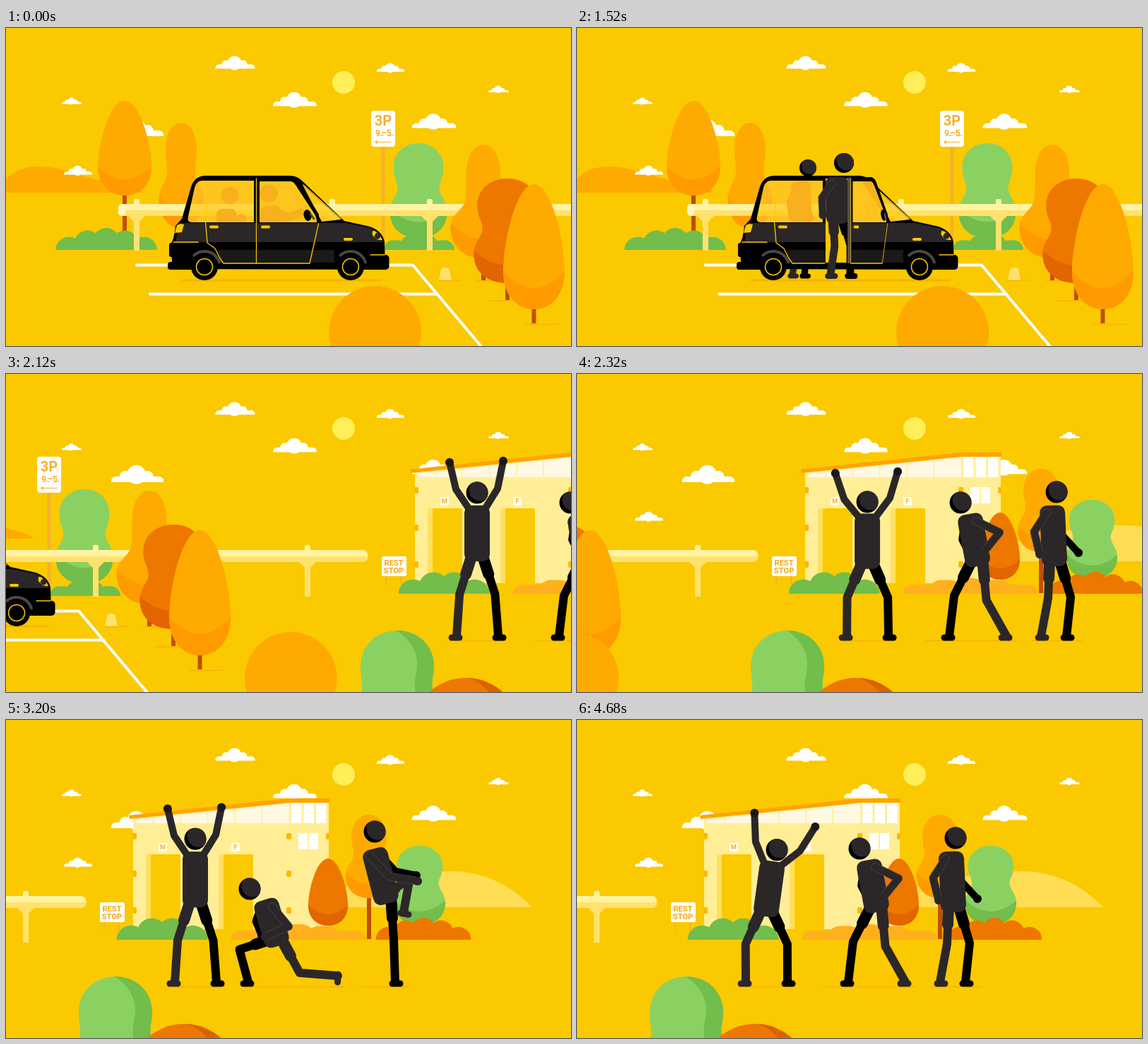
Animation of 800 by 450 pixels, one loop 4720 ms. Source, as an HTML page with a canvas:

```html
<!DOCTYPE html>
<html lang="en">
<head>
<meta charset="utf-8">
<title>Rest stop</title>
<style>
html, body { margin: 0; height: 100%; overflow: hidden; background: #fbc900; }
canvas { display: block; width: 100vw; height: 100vh; }
</style>
</head>
<body>
<canvas id="stage" width="800" height="450"></canvas>
<script>
const g = document.getElementById('stage').getContext('2d');
const LOOP = 4720, STEP = 40, REST_X = 872;
const SKY = '#fbc900', ORANGE = '#ffaa00', AMBER = '#ff9b00', RUST = '#ee7700', BRICK = '#e26500',
  GREEN = '#8bd162', LEAF = '#72bd4b', TRUNK = '#c24d00', CREAM = '#fff3a3', BUTTER = '#ffe26e',
  WALL = '#ffee96', SIGN = '#f5b12a', SHADOW = '#f5b400', INK = '#2b2728', STEEL = '#4a4646',
  BLACK = '#000', WHITE = '#fff';

// Drawing helpers
const fill = (c, d) => { g.fillStyle = c; g.fill(new Path2D(d), 'evenodd'); };
const box = (c, x, y, w, h, r = 0) => { g.fillStyle = c; g.beginPath(); g.roundRect(x, y, w, h, r); g.fill(); };
const disc = (c, x, y, r) => { g.fillStyle = c; g.beginPath(); g.arc(x, y, r, 0, 7); g.fill(); };
const line = (c, w, ...p) => {
  g.strokeStyle = c; g.lineWidth = w; g.lineCap = g.lineJoin = 'round';
  g.beginPath();
  for (let i = 0; i < p.length; i += 2) g.lineTo(p[i], p[i + 1]);
  g.stroke();
};
const text = (s, x, y, size, weight = 700) => {
  g.fillStyle = SIGN; g.textAlign = 'center';
  g.font = `${weight} ${size}px Roboto, Arial, sans-serif`;
  g.fillText(s, x, y);
};
const group = (x, y, draw) => { g.save(); g.translate(x, y); draw(); g.restore(); };
const clamp = v => Math.max(0, Math.min(1, v));
const ramp = (t, a, b) => { const u = clamp((t - a) / (b - a)); return u * u * (3 - 2 * u); };

// Scenery
const EGG = 'M0 0C23 0 40 60 40 90C40 116 22 130 0 130S-40 116-40 90C-40 60-23 0 0 0Z';
const jar = k => {
  const w = k * .5 + 12, n = k * .6;
  return `M0 0C${n} 0 ${k} 15 ${k} 33C${k} 50 ${w - 2} 54 ${w} 65C${w + 2} 74 40 80 40 94C40 118 22 130 0 130` +
    `S-40 118-40 94C-40 80 ${-w - 2} 74 ${-w} 65C${2 - w} 54 ${-k} 50 ${-k} 33C${-k} 15 ${-n} 0 0 0Z`;
};
function tree(shape, x, y, w, h, col, shade, foot) {
  if (foot) box(TRUNK, x - 3, y + h - 8, 6, foot - y - h + 8);
  group(x, y, () => {
    g.scale(w / 80, h / 130);
    fill(col, shape);
    g.clip(new Path2D(shape));
    fill(shade, 'M-50 80Q0 136 50 80V140H-50Z');
  });
}
function bush(col, x, w, base, h, n) {
  for (let i = 0; i < n; i++) {
    const u = (i + .5) / n, r = .72 * w / n, top = h * (.4 + .6 * Math.sin(Math.PI * u));
    box(col, x + w * u - r, base - top, 2 * r, top, [r, r, 0, 0]);
  }
}
function cloud(x, y, s) {
  group(x, y, () => {
    g.scale(s, s);
    box(WHITE, -28, -6, 56, 6, [5, 5, 0, 0]);
    disc(WHITE, -13, -6, 6);
    disc(WHITE, -1, -8, 10);
    disc(WHITE, 11, -6, 6);
  });
}
function clouds() {
  cloud(324.5, 57.5, 1); cloud(409, 110.5, 1.1); cloud(544.5, 62, .7); cloud(697.5, 91, .51);
  cloud(606, 141.5, 1.12); cloud(93, 107.5, .5); cloud(186, 153, 1.33); cloud(102, 207.5, .71);
}
function rail() {
  for (const x of [185, 462, 600, 900]) {
    box(CREAM, x - 4, 242, 8, 12, 2);
    box(BUTTER, x - 4, 262, 8, 53);
    fill(BUTTER, `M${x - 12} 266H${x + 12}L${x + 4} 274H${x - 4}Z`);
  }
  box(BUTTER, 159, 249, 827, 17, 8);
  box(CREAM, 162, 249, 822, 9, [6, 6, 0, 0]);
  box('#fff7c0', 159, 249, 10, 17, 5);
}
function parking() {
  tree(jar(28), 248, 134, 63, 149, ORANGE, AMBER);
  tree(EGG, 168, 103, 76, 134, ORANGE, AMBER, 314);
  box(SIGN, 531.5, 166, 5, 136);
  box(WHITE, 517, 117, 34, 51, 4);
  text('3P', 534, 138, 20);
  text('9', 526.5, 153, 12); text('am', 532, 153, 4); text('–5', 538.5, 153, 12); text('pm', 546, 153, 4);
  line(SIGN, 1.2, 523, 161.5, 545, 161.5);
  line(SIGN, 1.2, 525.5, 159.5, 523, 161.5, 525.5, 163.5);
  tree(jar(35), 584, 163, 81, 134, GREEN, LEAF);
  bush(LEAF, 76, 132, 314, 31, 5);
  bush(LEAF, 540, 90, 314, 22, 4);
  rail();
  fill(BUTTER, 'M613 357L616 342Q617 339 622 339T628 342L631 357Z');
  line(SHADOW, 1.5, 613, 357.5, 644, 357.5);

  line(WHITE, 4, 185, 335.5, 576, 335.5, 674, 452);
  line(WHITE, 4, 204, 376.5, 611, 376.5);

  line(SHADOW, 1.5, 667, 357.5, 692, 357.5);
  line(SHADOW, 1.5, 684, 386, 728, 386);
  line(SHADOW, 1.5, 733, 419.5, 781, 419.5);
  tree(jar(21), 676, 165, 93, 161, ORANGE, AMBER, 357);
  tree(jar(36), 710, 213, 95, 148, RUST, BRICK, 385);
  tree(EGG, 747.5, 221, 87, 177, ORANGE, AMBER, 418);
}

function building() {
  box(WALL, 180, 143, 277, 153);
  fill(WALL, 'M180 139L401 115H457V150H180Z');
  fill('#fff8e2', 'M184 141L401 118V146H184Z');
  for (let i = 0; i < 5; i++) {
    const x = 209 + 38.3 * i;
    line(WALL, 1.5, x, 141 - (x - 184) * .106, x, 146);
  }
  for (let i = 0; i < 3; i++) box(WHITE, 404 + 17.5 * i, 118, 14.5, 28);
  box(WHITE, 414, 160, 28, 23);
  line(WALL, 2, 428, 160, 428, 183);
  fill('#ffa300', 'M174 135L400 111H458V117H402L175 140Z');
  for (const y of [160, 213, 265]) {
    box('#ffb700', 179, y, 6, 9, 2);
    box('#ffb700', 397, y, 7, 9, 2);
  }
  box('#ffb700', 453, 160, 5, 9, 2);
  for (const [x, s] of [[198, 'M'], [301, 'F']]) {
    box('#ffdf60', x, 190, 49, 106, [3, 3, 0, 0]);
    box(SKY, x + 7, 190, 42, 106, [3, 3, 0, 0]);
    box(WHITE, x + 18, 174, 12, 12, 2);
    text(s, x + 24, 183.3, 9);
  }
}
function restArea(t) {
  fill('#ffdd55', 'M400 265C470 236 560 214 630 214C680 214 720 238 745 265Z');
  building();
  line(SIGN, 2, 139, 286, 139, 297);
  line(SIGN, 2, 160, 286, 160, 297);
  box(WHITE, 133, 258, 35, 28, 2.5);
  text('REST', 150, 271, 11, 900); text('STOP', 150, 282, 11, 900);
  tree(jar(30), 514, 134, 66, 118, ORANGE, AMBER, 310);
  tree(EGG, 456, 196, 56, 95, RUST, BRICK);
  tree(jar(36), 586, 178, 72, 112, GREEN, LEAF);
  bush(LEAF, 163, 116, 311, 32, 4);
  bush('#ffb01c', 326, 176, 311, 22, 5);
  bush(RUST, 529, 124, 311, 31, 5);

  for (const [a, b] of [[229, 310], [350, 480], [500, 572]]) line(SHADOW, 1.5, a, 377.5, b, 377.5);
  person(cheering(t), 0);
  person(lunging(t), -1);
  person(hugging(t), 1);

  const shrub = 'M103 415C103 382 127 363 155 363C185 363 207 385 207 413C207 430 202 432 206 452H104C107 435 103 430 103 415Z';
  g.save();
  fill(GREEN, shrub);
  g.clip(new Path2D(shrub));
  fill(LEAF, 'M148 360C172 372 184 393 183 412C182 430 177 432 181 455H215V360Z');
  g.restore();
  g.save();
  disc(RUST, 252, 508, 78);
  g.clip();
  fill('#dc6200', 'M248 428Q275 434 288 455H340V428Z');
  g.restore();
}

// Figures: each pose follows from one or two progress values.
// Hands and feet are [x, y, bend]: the elbow or knee sits beside the middle of the limb.
function cheering(t) {
  const e = ramp(t, 4200, 4680);
  const d = (1 - Math.cos((t - 2120) / 1050 * 2 * Math.PI)) / 2 * (1 - .6 * e);
  return {
    head: [268 + 15 * e, 168 + 41 * d], neck: [268 + 8 * e, 196 + 36 * d], hip: [268, 255 + 34 * d],
    hands: [[229 - 20 * d + 30 * e, 125 + 48 * d - 12 * e, -7], [305 + 19 * d + 25 * e, 123 + 47 * d + 10 * e, 7]],
    feet: [[239, 371, 7 + 12 * d], [298, 371, -7 - 12 * d]]
  };
}
function lunging(t) {
  const u = ramp(t, 2400, 3100) - ramp(t, 3960, 4560), s = Math.sin(Math.PI * u);
  return {
    head: [400 - 55 * u, 182 + 57 * u], neck: [414 - 45 * u, 208 + 56 * u], hip: [424 - 41 * u, 262 + 48 * u],
    hands: [[432 - 65 * u, 253 + 54 * u, -29], [414 - 52 * u, 258 + 47 * u, 8]],
    feet: [[465 + 5 * u, 371 - 9 * u, 12 + 14 * u], [384 - 41 * u - 22 * s, 371 - 26 * s, 10 + 23 * u + 14 * s]]
  };
}
function hugging(t) {
  const u = ramp(t, 2620, 3080) - ramp(t, 3960, 4520);
  return {
    head: [536 - 14 * u, 167 - 9 * u], neck: [530 - 7 * u, 196 - 4 * u], hip: [533 + 5 * u, 262 - 12 * u],
    hands: [[512 + 71 * u, 255 - 27 * u, 13], [567 + 14 * u, 253 - 33 * u, 9]],
    feet: [[514 + 49 * u, 371 - 99 * u, -4 - 39 * u], [550 + u, 371, 10 * u - 11]]
  };
}
function driver(t) {
  const v = ramp(t, 240, 760), u = ramp(t, 760, 1300);
  return {
    head: [372 + 13 * v - 4 * u, 234 - 43 * u], neck: [375 + 4 * v - 8 * u, 260 - 40 * u], hip: [376 - 4 * u, 298 - 30 * u],
    hands: [[412 - 22 * v - 39 * u, 265, 8], [418 - 8 * v - 22 * u, 260 + 5 * u, 6]],
    feet: [[410 - 48 * u, 325 + 24 * u, 14 * u - 18], [415 - 25 * u, 325 + 24 * u, -6]]
  };
}
function rider(t) {
  const v = ramp(t, 240, 760), u = ramp(t, 760, 1300);
  return {
    head: [317 - 7 * v + 20 * u, 237 - 39 * u], neck: [312 + 8 * u, 264 - 39 * u], hip: [312 + 9 * u, 296 - 24 * u],
    hands: [[334 - 27 * u, 268, 6], [336 - 2 * u, 270 - 2 * u, 5]],
    feet: [[330 - 22 * u, 325 + 24 * u, -4], [332 - 5 * v - 2 * u, 325 + 24 * v, -4]]
  };
}

const middle = (x, y, [ex, ey, bend]) => {
  const n = Math.hypot(ex - x, ey - y) || 1;
  return [(x + ex) / 2 - bend * (ey - y) / n, (y + ey) / 2 + bend * (ex - x) / n];
};
// Facing is -1 for left, 1 for right and 0 for the viewer.
function person({ head, neck, hip, hands, feet }, facing, r = 15.5, ground = 371) {
  const k = r / 15.5, near = facing < 0 ? 1 : -1;
  const arm = (side, hand, c) => {
    const x = neck[0] + side * 8 * k, y = neck[1];
    const pts = [x, y, ...middle(x, y, hand), hand[0], hand[1]];
    if (facing && c === INK) line(STEEL, 11.5 * k, ...pts);
    line(c, 10 * k, ...pts);
    disc(facing ? c : '#1a1717', hand[0], hand[1], 6 * k);
  };
  const leg = (side, foot, c) => {
    const x = hip[0] + side * 7 * k, y = hip[1], [fx, fy] = foot, [kx, ky] = middle(x, y, foot);
    line(c, 16 * k, x, y, (x + kx) / 2, (y + ky) / 2);
    line(c, 12 * k, x, y, kx, ky, fx, fy);
    // The sole lies flat on the ground and follows the shin in the air.
    const shin = Math.hypot(fx - kx, fy - ky) || 1, air = clamp((ground - fy) / 8), toe = facing || side;
    const dx = toe * k * (1 - air + air * (fy - ky) / shin), dy = -toe * k * air * (fx - kx) / shin;
    line(c, 9 * k, fx - dx * 4, fy - dy * 4 + 2, fx + dx * 7, fy + dy * 7 + 2);
  };
  arm(-near, hands[1], facing ? BLACK : INK);
  leg(-near, feet[1], BLACK);
  leg(near, feet[0], INK);

  const spine = Math.hypot(hip[0] - neck[0], hip[1] - neck[1]);
  const px = 8 * k * (hip[1] - neck[1]) / spine, py = -8 * k * (hip[0] - neck[0]) / spine;
  line(INK, 20 * k, neck[0] - px, neck[1] - py, neck[0] + px, neck[1] + py,
    hip[0] + px, hip[1] + py, hip[0] - px, hip[1] - py, neck[0] - px, neck[1] - py);
  g.fillStyle = INK;
  g.fill();

  arm(near, hands[0], INK);
  g.save();
  disc(BLACK, head[0], head[1], r);
  g.clip();
  disc(INK, head[0] + 4 * k, head[1] - 4 * k, r);
  g.restore();
}

// Car
const DOOR = 'M355 211H404Q412 212 416 219L443 264V276L431 333H355Z';
const FRONT_GLASS = 'M359 217H402Q407 217 410 222L436 262Q440 268 440 275H359Z';
const REAR_GLASS = 'M277 216H351V275H263Q256 275 258 267L267 226Q270 216 277 216Z';
const SCREEN = 'M420 222L474 271L447 274Z';
const BODY = 'M236 341L233 306Q238 300 240 280L249 270L262 225Q267 209 283 209H402Q412 209 419 216' +
  'L479 273L515 281Q533 287 536 303L537 342Z';

// Yellow glass that turns dark figures behind it orange
function glass(d) {
  fill('rgba(255,196,0,.6)', d);
  g.globalCompositeOperation = 'lighten';
  fill('#f8b01e', d);
  g.globalCompositeOperation = 'source-over';
}
function wheel(x) {
  g.strokeStyle = STEEL; g.lineWidth = 4;
  g.beginPath(); g.arc(x, 338, 22, -2.3, -.3); g.stroke();
  disc(BLACK, x, 338, 19);
  g.strokeStyle = SKY; g.lineWidth = 1.5;
  g.beginPath(); g.arc(x, 338, 11.5, 0, 7); g.stroke();
}
function door(open) {
  const k = 1 - .41 * open;
  box('#555152', 443 - 88 * k - 5 * open, 212, 5 * open, 121);
  group(443, 0, () => {
    g.scale(k, 1); g.translate(-443, 0);
    glass(FRONT_GLASS);
    fill(BLACK, DOOR + FRONT_GLASS);
    fill(INK, 'M356 276H442L436 303H356Z');
    box('#1c1919', 356, 314, 78, 18);
    line(SKY, 1.3, 354.5, 213, 354.5, 333, 430, 333, 442.5, 277);
    box(SKY, 361, 279.5, 13, 4, 2);
  });
  g.fillStyle = BLACK;
  g.beginPath(); g.ellipse(427 + 10 * open, 265, 5.5 - 2 * open, 8, -.2, 0, 7); g.fill();
  line(STEEL, 3, 431 + 8 * open, 263, 436 + 4 * open, 270);
}
function shell() {
  glass(REAR_GLASS);
  glass(SCREEN);
  fill(BLACK, BODY + REAR_GLASS + SCREEN);
  fill(INK, 'M245 276H481L515 283Q530 288 534 303H240Z');
  box('#1c1919', 300, 314, 165, 18);
  box(BLACK, 229, 331, 36, 11, 4);
  box(BLACK, 506, 321, 36.5, 21, 5);
  box(BLACK, 231, 304, 10, 20, 3);
  fill(SKY, 'M239 290L242 279Q247 276 252 278L249 289Z');
  line(SKY, 1.3, 237, 303, 272, 303);
  line(SKY, 1.3, 289, 217, 285, 240, 282.5, 275, 285, 304, 296, 312, 303, 326, 308, 333, 354, 333);
  box(SKY, 288, 279.5, 13, 4, 2);
  box(SKY, 478, 297, 13, 4, 2);
  fill(SKY, 'M519 287Q528 287 533 300Q524 301 519 293Z');
  disc(INK, 526, 294, 4.5);
  disc(SKY, 521, 290.5, 2.5);
  line(SKY, 1.3, 516, 321, 536, 321);
  line(SKY, 1.3, 421, 222, 474, 270);
  fill(SKY, 'M355 213H404L442 270V276L431 332H355Z');
  g.strokeStyle = SIGN; g.lineWidth = 2;
  g.beginPath(); g.ellipse(420, 261, 4, 10, .4, 0, 7); g.stroke();
}
function car(t) {
  const bob = t > 800 && t < 1320 ? Math.sin((t - 880) / 70) : 0;
  line(SHADOW, 3, 250, 357, 531, 357);
  person(rider(t), 1, 12, 349);
  group(0, bob, shell);
  person(driver(t), 1, 12.5 + 1.5 * ramp(t, 880, 1300), 349);
  group(0, bob, () => door(ramp(t, 260, 680)));
  wheel(281); wheel(488);
}

// Camera pan with a strong ease in and a longer ease out
function pan(t) {
  const a = clamp((t - 1360) / 740), b = clamp((2950 - t) / 850);
  return REST_X * (t < 2100 ? .5 * a ** 3.24 : 1 - .5 * b ** 3.72);
}
function draw(t) {
  const x = pan(t);
  box(SKY, 0, 0, 800, 450);
  disc('#ffef58', 478, 77, 16);
  group(-x * .33, 0, () =>
    fill(ORANGE, 'M-14 233C2 205 22 196 45 196C80 196 105 210 132 215C160 218 178 221 196 233Z'));
  clouds();
  group(REST_X - x, 0, () => restArea(t));
  group(-x, 0, () => { parking(); car(t); });
  group(-x * 1.6, 0, () => {
    disc(ORANGE, 522.5, 430.5, 65.5);
    disc(ORANGE, 1160, 430.5, 65.5);
  });
}
function tick() {
  draw(Math.floor(performance.now() % LOOP / STEP) * STEP);
  requestAnimationFrame(tick);
}
tick();
</script>
</body>
</html>
```
